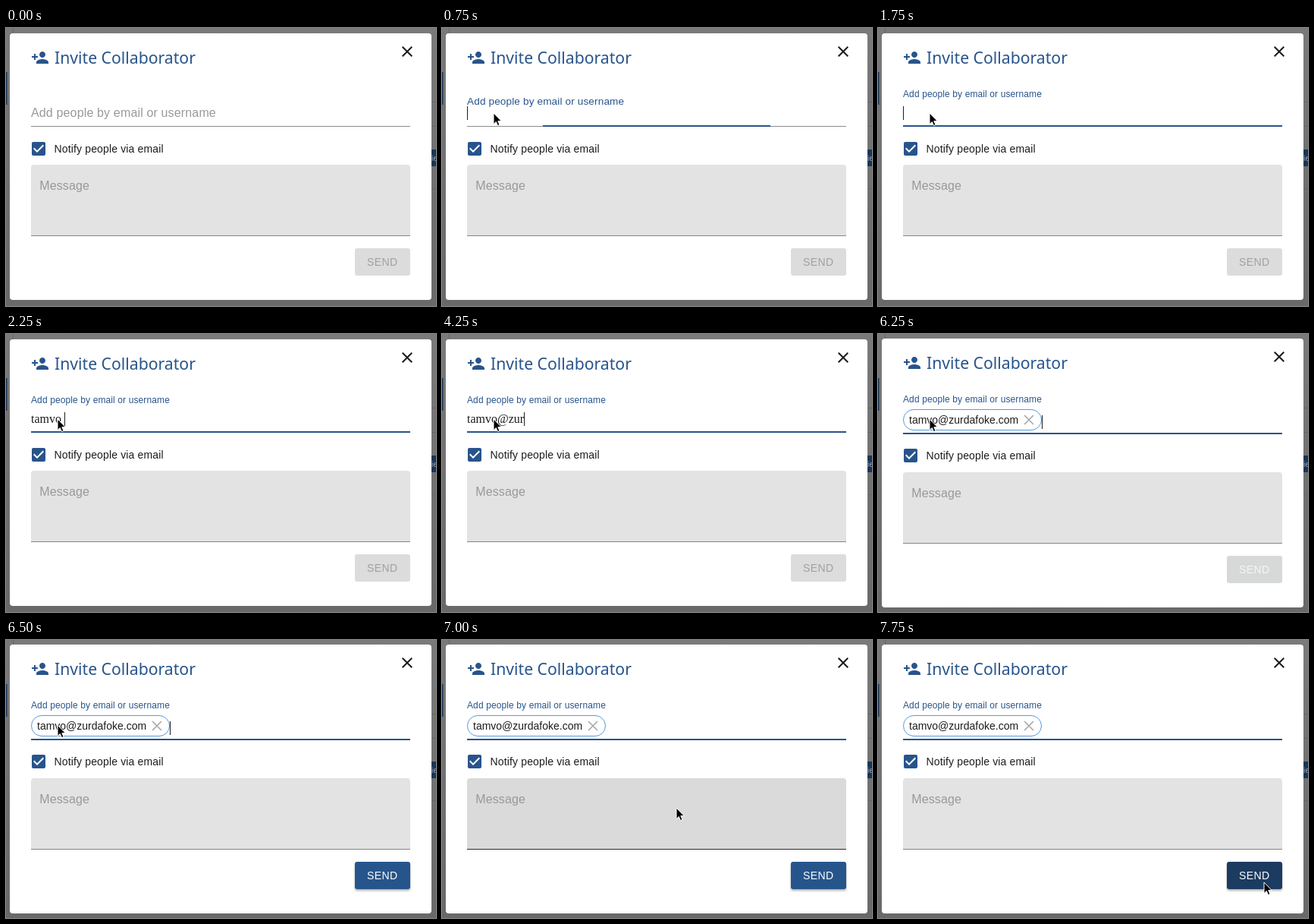
An HTML page for the animation above (8 s loop, 567 by 366 pixels).

```html
<!DOCTYPE html>
<html lang="en">
<head>
<meta charset="utf-8">
<title>Invite Collaborator</title>
<style>
  html, body { margin: 0; width: 100%; height: 100%; overflow: hidden; background: #737373; }
  svg { display: block; width: 567px; height: 366px; }
  text { font-family: "Liberation Sans", Arial, sans-serif; white-space: pre; }
  .title { font: 21.2px "Noto Sans", "Open Sans", sans-serif; }
  .body { font-size: 16px; letter-spacing: .00938em; }
  .small { font-size: 14px; letter-spacing: .01071em; }
  .btn { font-size: 14px; font-weight: 500; letter-spacing: .02857em; }
  .typed { font: 16px "Liberation Serif", "Times New Roman", serif; }
</style>
</head>
<body>
<svg viewBox="0 0 567 366" xmlns="http://www.w3.org/2000/svg">
  <defs>
    <linearGradient id="dim" x2="0" y2="1">
      <stop stop-color="#7a7a7a"/>
      <stop offset="1" stop-color="#696969"/>
    </linearGradient>
    <filter id="lift" x="-20%" y="-30%" width="140%" height="180%">
      <feDropShadow dx="0" dy="2" stdDeviation="1.6" flood-opacity=".32"/>
    </filter>
  </defs>

  <rect width="567" height="366" fill="url(#dim)"/>
  <path d="M9.5 0V366M561 97.5H567M561 129.5H567M561 211.5H567" stroke="#666"/>
  <rect y="58" width="1.5" height="43" fill="#1b3557"/>
  <rect x="559" y="160" width="8" height="22" fill="#1a3558"/>
  <text x="561" y="175" font-size="11" fill="#9aa3ae">ie</text>
  <rect id="modal" x="5" width="556" rx="4" fill="#fff"/>

  <g id="head">
    <path transform="translate(33 27)" fill="#28548c" d="M15 12c2.21 0 4-1.79 4-4s-1.79-4-4-4-4 1.79-4 4 1.79 4 4 4zm-9-2V7H4v3H1v2h3v3h2v-3h3v-2H6zm9 4c-2.67 0-8 1.34-8 4v2h16v-2c0-2.66-5.33-4-8-4z"/>
    <text class="title" x="64" y="47" fill="#28548c">Invite Collaborator</text>
    <path transform="translate(517 19)" fill="#1c1c1c" d="M19 6.41L17.59 5 12 10.59 6.41 5 5 6.41 10.59 12 5 17.59 6.41 19 12 13.41 17.59 19 19 17.59 13.41 12z"/>
    <text id="label" class="body">Add people by email or username</text>
  </g>

  <rect id="line" x="33" width="500"/>
  <rect id="focus" fill="#28548c" height="2"/>
  <text id="typed" class="typed" x="33" y="117" fill="#1c1c1c" xml:space="preserve"></text>
  <g id="chip">
    <rect x="33.5" y="99.5" width="182" height="27" rx="13.5" fill="#fff" stroke="#559bdc"/>
    <text id="address" x="41" y="118" font-size="14" fill="#1c1c1c"></text>
    <path d="M193 107l12 12m0-12l-12 12" stroke="#a8a8a8" stroke-width="1.6"/>
  </g>
  <rect id="caret" width="1" height="18" fill="#1c1c1c"/>

  <g id="notify">
    <path transform="translate(31 147)" fill="#28548c" d="M19 3H5c-1.11 0-2 .9-2 2v14c0 1.1.89 2 2 2h14c1.11 0 2-.9 2-2V5c0-1.1-.89-2-2-2zm-9 14l-5-5 1.41-1.41L10 14.17l7.59-7.59L19 8l-9 9z"/>
    <text class="small" x="63.5" y="164" fill="#1c1c1c">Notify people via email</text>
  </g>

  <g id="foot">
    <path id="box" d="M33 273V184a4 4 0 0 1 4-4H529a4 4 0 0 1 4 4V273z"/>
    <rect id="boxLine" x="33" y="273" width="500" height="1"/>
    <text class="body" x="44.2" y="213" fill="#999">Message</text>
    <rect id="send" x="460" y="290" width="73" height="36" rx="3"/>
    <text id="sendText" class="btn" x="476" y="313">SEND</text>
  </g>

  <path id="cursor" d="M0 0V14.6L3.3 11.5 5.5 16.6 8 15.5 5.8 10.6H10.3Z" stroke="#fff" stroke-linejoin="round"/>
</svg>
<script>
const LOOP = 8000, STEP = 250;
const BLUE = '#28548c';
const ADDRESS = 'tamvo@zurdafoke.com';

// Each track is a list of [start ms, value]; a value holds until the next one.
const typing = [[0, 0], [2000, 2], [2250, 6], [3250, 5], [3500, 6], [4250, 9],
  [4500, 12], [4750, 14], [5000, 17], [5250, 19], [6250, 0]];
const caretOn = [[0, 0], [750, 1], [1250, 0], [1750, 1], [2750, 0], [3250, 1], [3750, 0],
  [4250, 1], [5750, 0], [6250, 1], [6750, 0], [7250, 1], [7750, 0]];
const pointer = [[0, null], [250, [230, 150]], [500, [95, 117]], [750, [68, 112]],
  [6750, [178, 162]], [7000, [309, 221]], [7250, [418, 262]], [7500, [498, 309]], [7750, [509, 319]]];
const focusing = [[0, 0], [750, .6], [1000, 1]];
const button = [
  [0, ['#dcdcdc', '#a0a0a0', false]],
  [6250, ['#d7d9d9', '#f5f5f5', false]],
  [6500, [BLUE, '#fff', true]],
  [7500, ['#224773', '#fff', true]],
  [7750, ['#1d3a60', '#fff', true]]];

const el = {};
document.querySelectorAll('svg [id]').forEach(e => el[e.id] = e);
el.address.textContent = ADDRESS;

const at = (track, t) => track.filter(k => k[0] <= t).pop()[1];
const set = (e, attrs) => { for (const k in attrs) e.setAttribute(k, attrs[k]); };
const show = (e, on) => set(e, { visibility: on ? 'visible' : 'hidden' });
const shift = (e, dy) => set(e, { transform: `translate(0 ${dy})` });

function render(time) {
  const t = Math.floor(time % LOOP / STEP) * STEP;
  const chip = t >= 6250 ? 1 : 0;

  set(el.modal, { y: 7 - chip, height: 351 + 3 * chip });
  shift(el.head, -chip);
  shift(el.notify, chip);
  shift(el.foot, 2 * chip);

  // Floating label and underline
  const f = at(focusing, t);
  set(el.label, {
    transform: `translate(33 ${117 - 26 * f}) scale(${1 - .25 * f})`,
    fill: f ? BLUE : '#999'
  });
  const hover = t === 500;
  set(el.line, { y: hover ? 128 : 129, height: hover ? 2 : 1, fill: hover ? '#212121' : '#8c8c8c' });
  show(el.line, f < 1);
  set(el.focus, { x: 283 - 250 * f, y: 128 + 2 * chip, width: 500 * f });

  // Typed text, chip and caret
  const n = at(typing, t);
  el.typed.textContent = n === 6 && t < 3250 ? ADDRESS.slice(0, 5) + ' ' : ADDRESS.slice(0, n);
  show(el.chip, chip);
  const end = n ? el.typed.getComputedTextLength() : 0;
  set(el.caret, { x: chip ? 216 : Math.floor(33 + end), y: chip ? 107 : 103 });
  show(el.caret, at(caretOn, t));

  // Pointer and what it hovers
  const p = at(pointer, t);
  show(el.cursor, p);
  if (p) set(el.cursor, { transform: `translate(${p})` });
  const over = p && p[1] > 181 && p[1] < 275;
  set(el.box, { fill: over ? '#dadada' : '#e3e3e3' });
  set(el.boxLine, { fill: over ? '#2a2a2a' : '#858585' });

  const [fill, ink, raised] = at(button, t);
  set(el.send, { fill, filter: raised ? 'url(#lift)' : 'none' });
  set(el.sendText, { fill: ink });
}

let start;
function tick(now) {
  start ??= now;
  render(now - start);
  requestAnimationFrame(tick);
}
render(0);
requestAnimationFrame(tick);
</script>
</body>
</html>
```
